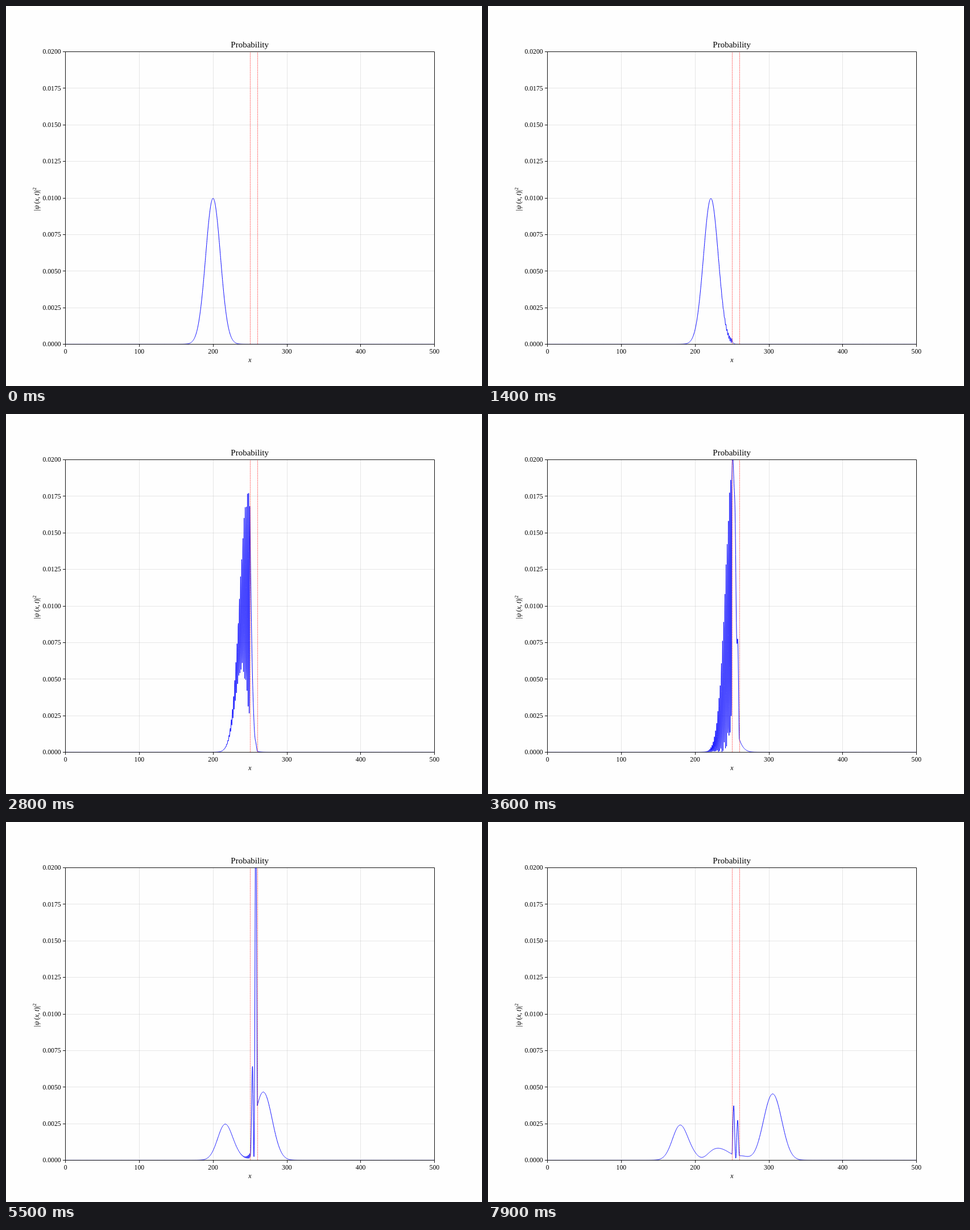
These frames come from a looping animation (837 by 669 pixels, 8 s). An HTML page:

```html
<!DOCTYPE html>
<html lang="en">
<head>
<meta charset="utf-8">
<title>Probability</title>
<style>
  html, body { margin: 0; width: 100%; height: 100%; overflow: hidden; background: #fefefe; }
  svg { display: block; }
  text { font: 11.7px "Liberation Serif", "Times New Roman", serif; }
  .math { font-style: italic; font-size: 12px; }
</style>
</head>
<body>
<svg width="837" height="669" viewBox="0 0 837 669">
  <clipPath id="area"><rect x="104.6" y="80.3" width="648.7" height="515.1"/></clipPath>
  <path id="grid" fill="none" stroke="#b0b0b0" stroke-opacity=".35" stroke-width=".93"/>
  <path id="wave" fill="none" stroke="#00f" stroke-width=".95" stroke-linejoin="round" clip-path="url(#area)"/>
  <path id="walls" fill="none" stroke="#f00" stroke-width=".58" stroke-dasharray="2.15 .93"/>
  <path id="axes" fill="none" stroke="#000" stroke-width=".93"/>
  <g id="labels"></g>
  <text x="428.7" y="73" text-anchor="middle" style="font-size:15px">Probability</text>
  <text class="math" x="429" y="627" text-anchor="middle">x</text>
  <text class="math" transform="translate(57.5 340) rotate(-90)" text-anchor="middle"><tspan font-style="normal">|</tspan>ψ&#8201;<tspan font-style="normal">(</tspan>x,&#8201;t<tspan font-style="normal">)|</tspan><tspan dy="-4.5" style="font-size:8.5px;font-style:normal">2</tspan></text>
</svg>
<script>
const $ = id => document.getElementById(id);
const LEFT = 104.625, RIGHT = 753.3, TOP = 80.28, BOTTOM = 595.41;
const toX = x => LEFT + x / 500 * (RIGHT - LEFT);
const toY = p => BOTTOM - p / 0.02 * (BOTTOM - TOP);
const snap = v => Math.floor(v + 0.25) + 0.5;

function drawAxes() {
  const l = snap(LEFT), r = snap(RIGHT), t = snap(TOP), b = snap(BOTTOM);
  let grid = '', axes = `M${l} ${t}H${r}V${b}H${l}Z`, labels = '';
  for (let i = 0; i <= 5; i++) {
    const x = snap(toX(i * 100));
    if (i % 5) grid += `M${x} ${b}V${t}`;
    axes += `M${x} ${b}v4.5`;
    labels += `<text x="${toX(i * 100)}" y="612" text-anchor="middle">${i * 100}</text>`;
  }
  for (let i = 0; i <= 8; i++) {
    const p = i * 0.0025, y = snap(toY(p));
    if (i % 8) grid += `M${l} ${y}H${r}`;
    axes += `M${l} ${y}h-4.5`;
    labels += `<text x="96.6" y="${toY(p) + 4}" text-anchor="end">${p.toFixed(4)}</text>`;
  }
  $('grid').setAttribute('d', grid);
  $('axes').setAttribute('d', axes);
  $('walls').setAttribute('d', [250, 260].map(x => `M${snap(toX(x))} ${b}V${t}`).join(''));
  $('labels').innerHTML = labels;
}

// Wave packet meeting a square barrier: Schrödinger equation, finite differences.
const DX = 0.25, N = 500 / DX + 1, DT = 0.02, STEPS = 40, FRAMES = 80;
const K0 = 2, SIGMA = 10, START = 200, BARRIER = 1.7;
const re = new Float64Array(N), im = new Float64Array(N), diag = new Float64Array(N);

for (let i = 1; i < N - 1; i++) {
  const x = i * DX, d = x - START;
  const amp = Math.sqrt(DX / (SIGMA * Math.sqrt(2 * Math.PI))) * Math.exp(-d * d / (4 * SIGMA * SIGMA));
  re[i] = amp * Math.cos(K0 * x);
  im[i] = amp * Math.sin(K0 * x);
  diag[i] = 1 / (DX * DX) + (x >= 250 && x <= 260 ? BARRIER : 0);
}

// a += h * H b
function kick(a, b, h) {
  const off = 0.5 / (DX * DX);
  for (let i = 1; i < N - 1; i++) a[i] += h * (diag[i] * b[i] - off * (b[i - 1] + b[i + 1]));
}

function advance() {
  for (let s = 0; s < STEPS; s++) {
    kick(im, re, -DT / 2);
    kick(re, im, DT);
    kick(im, re, -DT / 2);
  }
}

function curve() {
  let d = '';
  for (let i = 0; i < N; i++) {
    const p = re[i] * re[i] + im[i] * im[i];
    d += (i ? 'L' : 'M') + toX(i * DX).toFixed(2) + ' ' + toY(p).toFixed(2);
  }
  return d;
}

drawAxes();
const curves = [];
for (let f = 0; f < FRAMES; f++) {
  if (f) advance();
  curves.push(curve());
}

let shown = -1;
const begin = performance.now();
function tick() {
  const f = Math.floor((performance.now() - begin) / 100) % FRAMES;
  if (f !== shown) $('wave').setAttribute('d', curves[shown = f]);
  requestAnimationFrame(tick);
}
tick();
</script>
</body>
</html>
```
